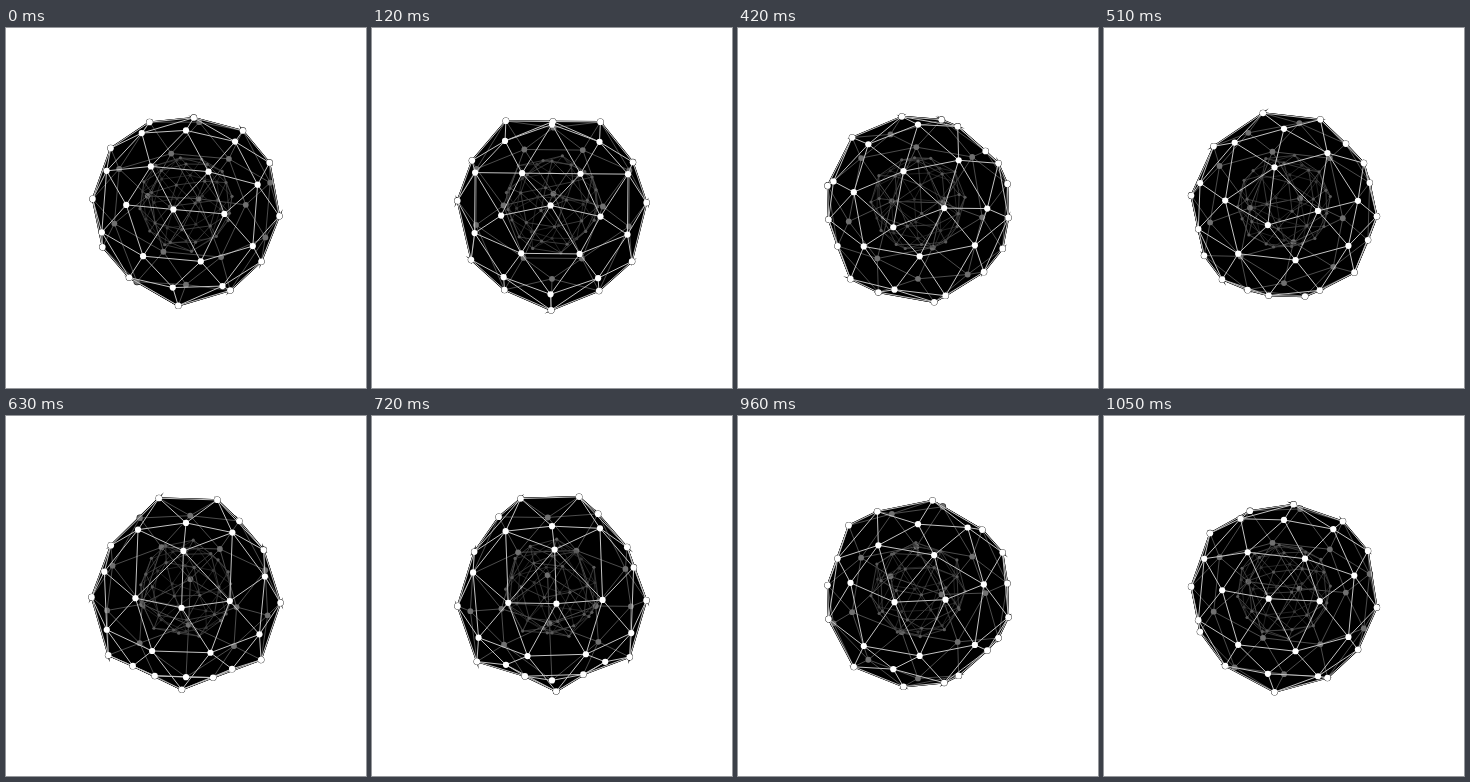
Write an HTML page with a canvas that moves like this. It is 360 px wide and 360 px high and loops after 1080 ms.

```html
<!DOCTYPE html>
<html>
<head>
<meta charset="utf-8">
<style>
html, body { margin: 0; width: 100%; height: 100%; overflow: hidden; background: #fff; }
canvas { display: block; }
</style>
</head>
<body>
<canvas id="stage" width="360" height="360"></canvas>
<script>
const ctx = document.getElementById('stage').getContext('2d');
const LOOP = 1080, STEP = 30, RAD = Math.PI / 180;
const TILT = 35.3 * RAD, WAVE = 9 / 94.5;

// Rings of a geodesic sphere: height, first azimuth, point count, wave phase
const rings = [
  [1, 0, 1, 0], [0.8507, 36, 5, 152], [0.5257, 0, 5, -22], [0.4472, 36, 5, 197],
  [0, 18, 10, 0],
  [-0.4472, 0, 5, 197], [-0.5257, 36, 5, -22], [-0.8507, 0, 5, 152], [-1, 0, 1, 0]
];
const verts = rings.flatMap(([h, first, count, phase]) =>
  Array.from({ length: count }, (_, i) => {
    const az = first + i * 360 / count, r = Math.sqrt(1 - h * h);
    return { h, r, az, phase, pos: [r * Math.sin(az * RAD), h, r * Math.cos(az * RAD)] };
  }));

const near = (i, j) => Math.hypot(...verts[i].pos.map((v, k) => v - verts[j].pos[k])) < 0.7;
const det = (a, b, c) =>
  a[0] * (b[1] * c[2] - b[2] * c[1]) +
  a[1] * (b[2] * c[0] - b[0] * c[2]) +
  a[2] * (b[0] * c[1] - b[1] * c[0]);

// Edges join close neighbours; faces are wound outwards
const edges = [], faces = [];
for (let i = 0; i < verts.length; i++) {
  for (let j = i + 1; j < verts.length; j++) {
    if (!near(i, j)) continue;
    edges.push([i, j]);
    for (let k = j + 1; k < verts.length; k++) {
      if (!near(i, k) || !near(j, k)) continue;
      const out = det(verts[i].pos, verts[j].pos, verts[k].pos) > 0;
      faces.push(out ? [i, j, k] : [i, k, j]);
    }
  }
}

function project(phase, turn, cy, size) {
  const pts = verts.map(v => {
    const a = (v.az + turn) * RAD;
    const wave = -WAVE * Math.sin((phase - v.phase) * RAD);
    const y = -v.h * Math.cos(TILT) + v.r * Math.cos(a) * Math.sin(TILT) + wave;
    return [180 + size * v.r * Math.sin(a), cy + size * y];
  });
  const frontEdges = new Set(), frontVerts = new Set();
  for (const f of faces) {
    const [a, b, c] = f.map(i => pts[i]);
    if ((b[0] - a[0]) * (c[1] - a[1]) - (b[1] - a[1]) * (c[0] - a[0]) >= 0) continue;
    f.forEach((v, i) => {
      const w = f[(i + 1) % 3];
      frontVerts.add(v);
      frontEdges.add(Math.min(v, w) + '-' + Math.max(v, w));
    });
  }
  return { pts, frontEdges, frontVerts };
}

function dot([x, y], r) {
  ctx.beginPath();
  ctx.arc(x, y, r, 0, 7);
  ctx.fill();
}

function drawBody({ pts }) {
  ctx.fillStyle = ctx.strokeStyle = '#000';
  ctx.lineWidth = 1.6;
  ctx.beginPath();
  for (const f of faces) {
    f.forEach((v, i) => ctx[i ? 'lineTo' : 'moveTo'](...pts[v]));
    ctx.closePath();
    ctx.stroke();
    ctx.fill();
    ctx.beginPath();
  }
  pts.forEach(p => dot(p, 3.4));
}

function drawSide(ball, front, line, color, width, r) {
  const { pts, frontEdges, frontVerts } = ball;
  ctx.strokeStyle = line;
  ctx.lineWidth = width;
  ctx.beginPath();
  for (const [i, j] of edges) {
    if (frontEdges.has(i + '-' + j) !== front) continue;
    ctx.moveTo(...pts[i]);
    ctx.lineTo(...pts[j]);
  }
  ctx.stroke();
  ctx.fillStyle = color;
  pts.forEach((p, i) => { if (frontVerts.has(i) === front) dot(p, r); });
}

function draw(now) {
  const phase = Math.floor(now % LOOP / STEP) * STEP / LOOP * 360;
  const turn = phase / 5 - 9;
  const outer = project(phase, turn, 179.5, 94.5);
  const inner = project(phase, turn + 22, 174.5, 47.2);
  ctx.clearRect(0, 0, 360, 360);
  drawBody(outer);
  drawSide(outer, false, '#555', '#707070', 0.9, 2.9);
  drawSide(inner, false, '#2c2c2c', '#3a3a3a', 0.8, 1.5);
  drawSide(inner, true, '#484848', '#5c5c5c', 0.8, 1.6);
  drawSide(outer, true, '#c4c4c4', '#fff', 1, 3.1);
}

function frame(now) {
  draw(now);
  requestAnimationFrame(frame);
}
draw(0);
requestAnimationFrame(frame);
</script>
</body>
</html>
```
